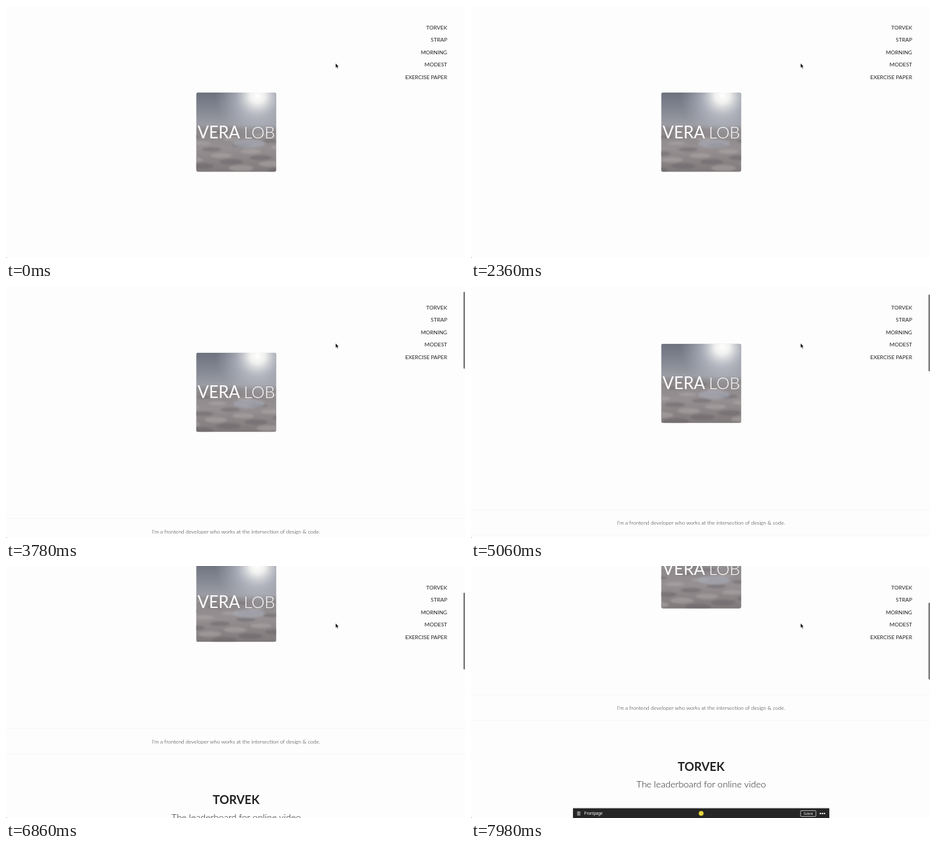
Recreate the animation shown at these times as an HTML page. Size 720x396 px, loop 8 s.

```html
<!DOCTYPE html>
<html lang="en">
<head>
<meta charset="utf-8">
<title>Portfolio scroll</title>
<style>
  html, body { margin: 0; width: 100%; height: 100%; overflow: hidden; background: #fdfdfd; }
  svg { display: block; width: 720px; height: 396px; font-family: Lato, sans-serif; }
  .nav { font-size: 8.45px; text-anchor: end; fill: #222; }
  .mid { text-anchor: middle; }
  .rule { fill: #f6f6f3; }
</style>
</head>
<body>
<svg viewBox="0 0 720 396">
  <defs>
    <linearGradient id="sky" x2="0" y2="1">
      <stop offset="0" stop-color="#6c717d"/>
      <stop offset=".22" stop-color="#848893"/>
      <stop offset=".4" stop-color="#9b9ca4"/>
      <stop offset=".47" stop-color="#8b8789"/>
      <stop offset=".7" stop-color="#969092"/>
      <stop offset="1" stop-color="#7f797a"/>
    </linearGradient>
    <radialGradient id="sun">
      <stop offset="0" stop-color="#fff"/>
      <stop offset=".18" stop-color="#fdfdfa" stop-opacity=".9"/>
      <stop offset=".5" stop-color="#cfd1da" stop-opacity=".55"/>
      <stop offset="1" stop-color="#b4b8c6" stop-opacity="0"/>
    </radialGradient>
    <filter id="soft" x="-50%" y="-50%" width="200%" height="200%"><feGaussianBlur stdDeviation="1.8"/></filter>
    <filter id="shade"><feGaussianBlur stdDeviation="1.5"/></filter>
    <clipPath id="card"><rect width="125.5" height="124.5" rx="3"/></clipPath>
  </defs>

  <rect width="720" height="396" fill="#fdfdfd"/>

  <g id="page">
    <g transform="translate(298.3 136)" clip-path="url(#card)">
      <rect width="126" height="125" fill="url(#sky)"/>
      <g id="clouds" filter="url(#soft)"></g>
      <ellipse cx="83" cy="80" rx="25" ry="7" fill="#a9acb9" opacity=".6" filter="url(#soft)"/>
      <circle cx="96" cy="5" r="66" fill="url(#sun)"/>
    </g>
    <text class="mid" x="361.3" y="207.6" font-size="26" fill="#fdfdfd" xml:space="preserve">VERA <tspan font-weight="300">LOB</tspan></text>

    <rect class="rule" y="396" width="720" height="1"/>
    <text class="mid" x="361" y="420" font-size="8.42" font-weight="300" fill="#222">I'm a frontend developer who works at the intersection of design &amp; code.</text>
    <rect class="rule" y="436" width="720" height="1"/>

    <text class="mid" x="361" y="515.8" font-size="18.6" font-weight="700" fill="#222">TORVEK</text>
    <text class="mid" x="361" y="541.4" font-size="14.5" font-weight="300" fill="#222">The leaderboard for online video</text>

    <g transform="translate(160 574.5)">
      <rect width="402" height="40" fill="#bbb" opacity=".6" filter="url(#shade)"/>
      <rect width="402" height="40" fill="#262626"/>
      <path d="M6.5 6h5M6.5 8.2h5M6.5 10.4h5" stroke="#f4f4f4"/>
      <g font-family="Liberation Sans, Arial, sans-serif" fill="#f4f4f4">
        <text x="17.5" y="10.5" font-size="6.4">Frontpage</text>
        <text class="mid" x="369" y="10" font-size="4.6">Submit</text>
      </g>
      <rect x="357" y="3.7" width="24" height="9.2" rx="1" fill="none" stroke="#e4e4e4" stroke-width=".8"/>
      <circle cx="201" cy="8" r="3.8" fill="#e6d43c"/>
      <g fill="#f4f4f4">
        <circle cx="388" cy="8.2" r="1.2"/><circle cx="391.2" cy="8.2" r="1.2"/><circle cx="394.4" cy="8.2" r="1.2"/>
      </g>
    </g>
  </g>

  <g id="nav"></g>
  <rect id="bar" x="717.5" width="3" height="120.5" rx="1" fill="#7d7d7d"/>
  <path d="M0 394.5v1.5h1.5z" fill="#999"/>
  <path d="M517 90v7.2l1.7-1.5 1.2 2.7 1.2-.5-1.2-2.7h2.2z" fill="#111" stroke="#fdfdfd" stroke-width=".4"/>
</svg>
<script>
const LOOP = 8000;
const $ = id => document.getElementById(id);

function add(parent, tag, attrs, text = '') {
  const node = document.createElementNS('http://www.w3.org/2000/svg', tag);
  for (const key in attrs) node.setAttribute(key, attrs[key]);
  node.textContent = text;
  return parent.appendChild(node);
}

['TORVEK', 'STRAP', 'MORNING', 'MODEST', 'EXERCISE PAPER'].forEach((label, i) =>
  add($('nav'), 'text', { class: 'nav', x: 692, y: 36.6 + i * 19.5 }, label));

// Cloud rows grow wider and drift faster towards the viewer.
const clouds = Array.from({ length: 20 }, (_, i) => {
  const depth = i / 19;
  return {
    depth,
    start: i * 61.8,
    node: add($('clouds'), 'ellipse', {
      cy: 60 + depth * 62,
      rx: 11 + depth * 9,
      ry: 2 + depth * 3,
      fill: i % 2 ? '#6a6568' : '#b2abaa',
      opacity: .5
    })
  };
});

// [time in ms, scroll offset in px]
const scrollKeys = [[0, 0], [3110, 0], [3220, 4.7], [4080, 45.3], [5060, 45.3],
  [6160, 103], [6600, 133], [6860, 141.3], [LOOP, 194.7]];

function scrollAt(time) {
  const next = scrollKeys.findIndex(key => key[0] > time);
  const [t0, y0] = scrollKeys[next - 1];
  const [t1, y1] = scrollKeys[next];
  return y0 + (y1 - y0) * (time - t0) / (t1 - t0);
}

function draw() {
  const time = performance.now() % LOOP;
  const scroll = scrollAt(time);
  $('page').setAttribute('transform', `translate(0 ${-scroll})`);
  $('bar').setAttribute('y', scroll * .298);
  $('bar').setAttribute('visibility', scroll > 0 ? 'visible' : 'hidden');
  for (const { node, depth, start } of clouds)
    node.setAttribute('cx', (start + time * (.004 + depth * .008)) % 170 - 22);
  requestAnimationFrame(draw);
}
draw();
</script>
</body>
</html>
```
